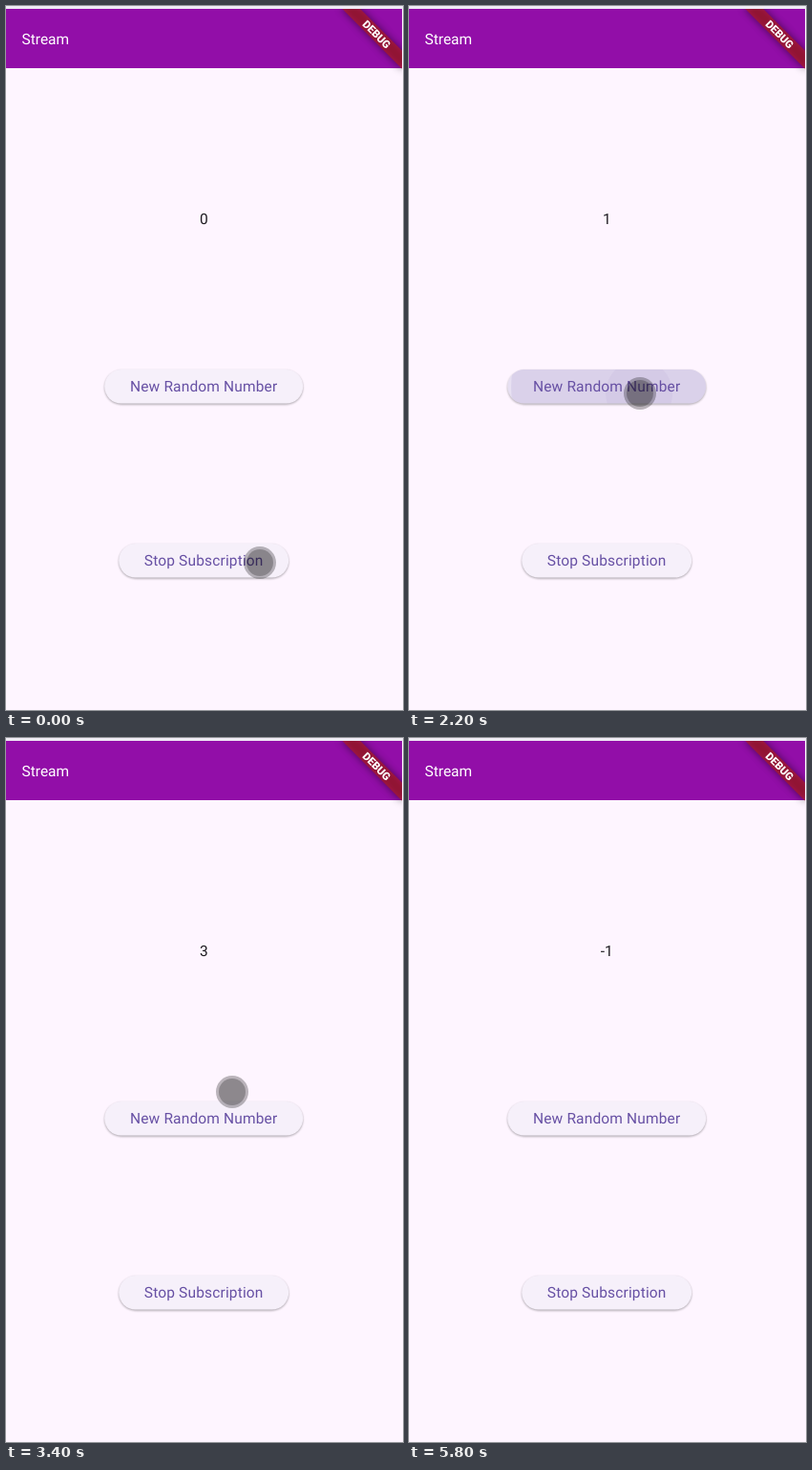
These frames come from a looping animation (416 by 736 pixels, 5.9 s). An HTML page:

```html
<!DOCTYPE html>
<html lang="en">
<head>
<meta charset="utf-8">
<title>Stream</title>
<style>
  html, body { margin: 0; width: 100%; height: 100%; overflow: hidden; background: #fef5ff; }
  svg { display: block; width: 416px; height: 736px; }
  text { font: 400 15.5px Roboto, sans-serif; text-rendering: geometricPrecision; }
  .label { fill: #6750a4; text-anchor: middle; letter-spacing: .16px; }
  .ink { fill: #6750a4; }
  .shade { fill: #000; }
</style>
</head>
<body>
<svg viewBox="0 0 416 736" xmlns="http://www.w3.org/2000/svg">
  <defs>
    <filter id="soft" x="-50%" y="-150%" width="200%" height="400%"><feGaussianBlur stdDeviation="4.2"/></filter>
    <filter id="lift" x="-10%" y="-30%" width="120%" height="160%"><feGaussianBlur stdDeviation=".8"/></filter>
    <clipPath id="screen"><rect y="3" width="415" height="733"/></clipPath>
  </defs>

  <rect width="416" height="736" fill="#fef5ff"/>
  <rect width="416" height="3" fill="#efebf5"/>
  <rect y="3" width="415" height="62" fill="#920ea8"/>
  <text x="16.5" y="39.5" fill="#fff">Stream</text>

  <text id="count" x="207.3" y="228.3" fill="#1d1b20" text-anchor="middle">0</text>
  <g id="buttons"></g>

  <g clip-path="url(#screen)">
    <g transform="translate(415 3) rotate(45)">
      <rect x="-44.3" y="31" width="88.6" height="13.3" fill="#000" opacity=".5" filter="url(#soft)"/>
      <rect x="-44.3" y="31" width="88.6" height="13.3" fill="#b71c1c" opacity=".627"/>
      <text x="0" y="41.7" fill="#fff" text-anchor="middle" style="font-size:11.3px;font-weight:900">DEBUG</text>
    </g>
  </g>

  <g id="pointer">
    <circle class="shade" r="17" opacity=".27"/>
    <circle class="shade" r="14" opacity=".24"/>
  </g>
</svg>

<script>
const LOOP = 5900, STEP = 100, CENTER = 207.2;

// time, x, y
const path = [
  [0, 266, 582], [200, 262, 552], [600, 244, 425], [800, 239, 400], [900, 239, 398],
  [1900, 241, 402], [2200, 242, 405], [2400, 242, 412], [2800, 238, 588], [2900, 238, 590],
  [3000, 238, 567], [3400, 237, 370], [4000, 237, 394], [4400, 237, 395], [4600, 237, 395]
];
const counts = [[0, '0'], [1400, '1'], [2300, '3'], [4200, '-1']];
const buttons = [
  { text: 'New Random Number', y: 380, w: 208, taps: [
    { down: 1250, up: 1350, x: 239, y: 399 },
    { down: 1980, up: 2080, x: 241, y: 404 },
    { down: 2160, up: 2250, x: 242, y: 405 },
    { down: 4050, up: 4150, x: 237, y: 395 }] },
  { text: 'Stop Subscription', y: 562, w: 178, taps: [
    { down: 2905, up: 3000, x: 237, y: 590 }] }
];

const $ = id => document.getElementById(id);
const clamp = v => Math.max(0, Math.min(1, v));
const mix = (a, b, k) => a + (b - a) * k;

function make(tag, attrs, parent) {
  const el = document.createElementNS('http://www.w3.org/2000/svg', tag);
  for (const key in attrs) el.setAttribute(key, attrs[key]);
  return parent.appendChild(el);
}

// cubic-bezier(.25, .1, .25, 1)
function ease(p) {
  const at = (a, b, s) => 3 * a * s * (1 - s) ** 2 + 3 * b * s * s * (1 - s) + s ** 3;
  let lo = 0, hi = 1;
  for (let i = 0; i < 18; i++) {
    const mid = (lo + hi) / 2;
    if (at(.25, .25, mid) < p) lo = mid; else hi = mid;
  }
  return at(.1, 1, lo);
}

buttons.forEach((b, i) => {
  const root = $('buttons');
  const box = { x: CENTER - b.w / 2, y: b.y, width: b.w, height: 35.6, rx: 17.8 };
  make('rect', { ...box, y: b.y + 1.1, class: 'shade', opacity: .32, filter: 'url(#lift)' }, root);
  make('rect', { ...box, fill: '#f6f0fa' }, root);
  make('rect', box, make('clipPath', { id: 'clip' + i }, root));
  const inks = make('g', { 'clip-path': `url(#clip${i})` }, root);
  b.glow = make('rect', { ...box, class: 'ink' }, inks);
  b.taps.forEach(tap => tap.el = make('circle', { class: 'ink' }, inks));
  make('text', { x: CENTER, y: b.y + 23.2, class: 'label' }, root).textContent = b.text;
});

function drawInk(b, t) {
  const full = Math.hypot(b.w, 35.6) / 2 + 5;
  let glow = 0;
  for (const tap of b.taps) {
    const held = Math.min(t, tap.up) - tap.down;
    const since = Math.max(0, t - tap.up);
    const k = ease(clamp(Math.max(0, held) / 1000 + since / 225));
    const alpha = clamp((t - tap.down) / 75) * clamp((375 - since) / 150);
    tap.el.setAttribute('cx', mix(tap.x, CENTER, k));
    tap.el.setAttribute('cy', mix(tap.y, b.y + 17.8, k));
    tap.el.setAttribute('r', mix(full * .3, full, k));
    tap.el.setAttribute('opacity', .1 * alpha);
    glow += clamp((t - tap.down) / 200 + (since ? .5 : 0)) * clamp((300 - since) / 200);
  }
  b.glow.setAttribute('opacity', .1 * clamp(glow));
}

function drawPointer(t) {
  const next = path.findIndex(p => p[0] > t);
  $('pointer').style.display = next < 0 ? 'none' : '';
  if (next < 0) return;
  const a = path[next - 1], b = path[next];
  const k = (t - a[0]) / (b[0] - a[0]);
  $('pointer').setAttribute('transform', `translate(${mix(a[1], b[1], k)} ${mix(a[2], b[2], k)})`);
}

const start = performance.now();
function frame() {
  const elapsed = Math.max(0, performance.now() - start) % LOOP;
  const t = Math.floor(elapsed / STEP) * STEP;
  $('count').textContent = counts.filter(c => c[0] <= t).pop()[1];
  buttons.forEach(b => drawInk(b, t));
  drawPointer(t);
  requestAnimationFrame(frame);
}
frame();
</script>
</body>
</html>
```
